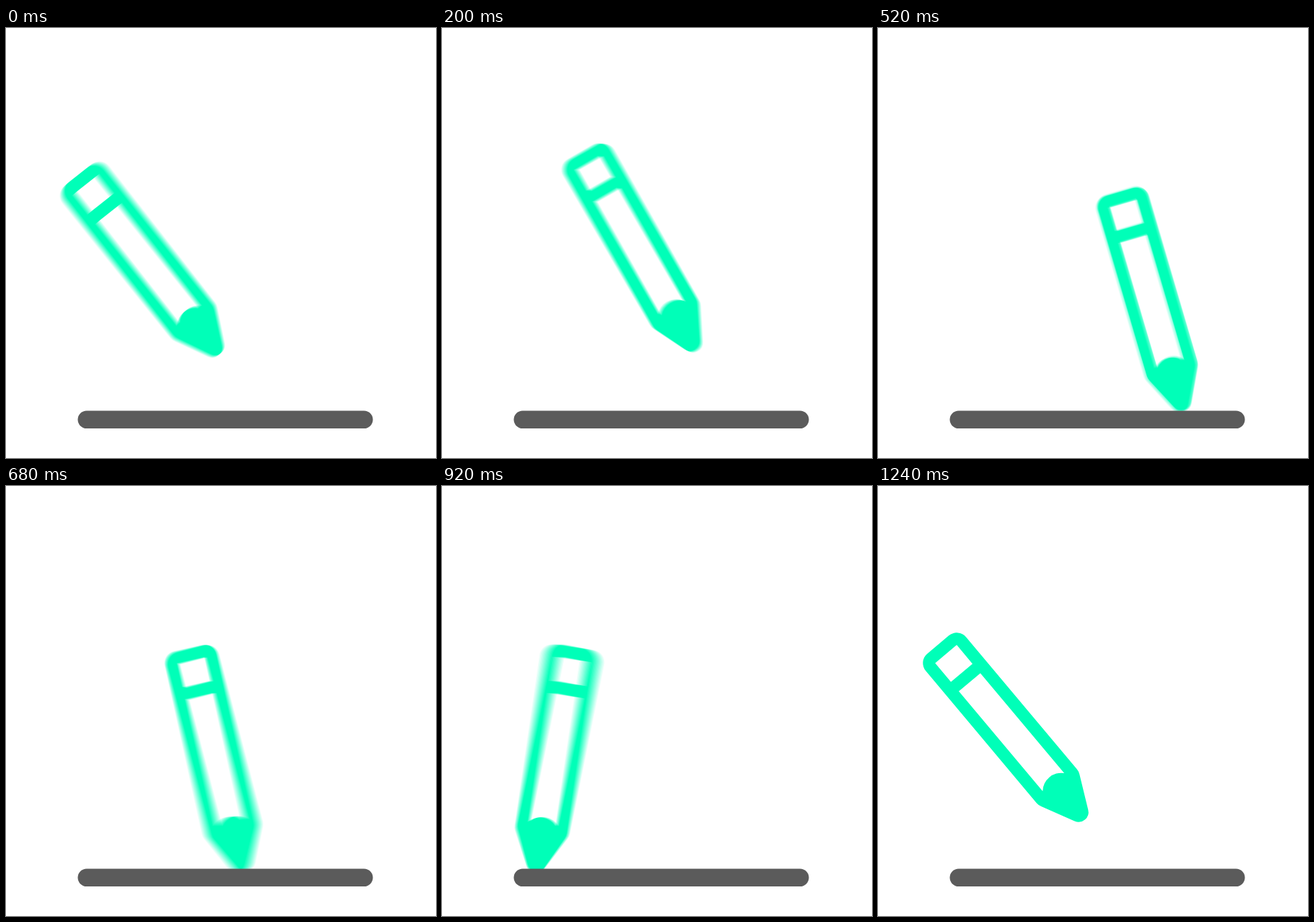
Recreate the animation shown at these times as an HTML page with a canvas. Size 596 px wide and 596 px high, loop 3040 ms.

```html
<!DOCTYPE html>
<html lang="en">
<head>
<meta charset="utf-8">
<title>Pencil</title>
<style>
  html, body { margin: 0; width: 100%; height: 100%; overflow: hidden; background: #fff; }
  canvas { display: block; }
</style>
</head>
<body>
<canvas id="stage" width="596" height="596"></canvas>
<script>
const ctx = document.getElementById('stage').getContext('2d');
const LOOP = 3040, STEP = 40;
const LAND = 13, TURN = 24, REST = 31;
const SAMPLES = 15, SHUTTER = 0.5;
const GREEN = '#00ffb8', GREY = '#5b5b5b';

// Pencil standing upright; the eraser hole starts at y = 0, the pivot is at y = 141.
const PIVOT = 141;
const pencil = new Path2D(
  'M-19.5 -17H19.5A17 17 0 0 1 36.5 0V239Q36.5 243 34.7 246.6L12.3 292' +
  'A13.7 13.7 0 0 1 -12.3 292L-34.7 246.6Q-36.5 243 -36.5 239V0A17 17 0 0 1 -19.5 -17Z' +
  'M-19.5 0H19.5V34H-19.5Z' +
  'M-19.5 51H19.5V231.8A26 26 0 0 0 -19.5 231.8Z');

const bar = new Path2D();
bar.roundRect(99.5, 530.4, 409, 24.6, 12.3);

const home = [184.8, 340.9], right = [381, 379], left = [133.5, 378.7];
const arc = [home, [243, 270], [340, 325], right];

// Tilt in degrees after landing: [step, angle]
const tilt = [[13, 16.2], [15, 15.4], [17, 13.7], [19, -3], [21, -19],
              [23, -10], [24, -1.5], [26, 13.6], [28, 26], [31, 40]];

const mix = (a, b, u) => a + (b - a) * u;
const mixPoint = (a, b, u) => [mix(a[0], b[0], u), mix(a[1], b[1], u)];

function bezier(points, u) {
  while (points.length > 1)
    points = points.slice(1).map((p, i) => mixPoint(points[i], p, u));
  return points[0];
}

// Smooth curve through uneven keys
function spline(keys, x) {
  const last = keys.length - 1;
  let i = 0;
  while (i < last - 1 && x > keys[i + 1][0]) i++;
  const slope = k => {
    const a = keys[Math.max(k - 1, 0)], b = keys[Math.min(k + 1, last)];
    return (b[1] - a[1]) / (b[0] - a[0]);
  };
  const [x0, y0] = keys[i], [x1, y1] = keys[i + 1];
  const w = x1 - x0, u = (x - x0) / w, v = 1 - u;
  return y0 * v * v * (1 + 2 * u) + y1 * u * u * (3 - 2 * u)
       + w * u * v * (v * slope(i) - u * slope(i + 1));
}

function pose(s) {
  if (s >= REST) return { at: home, angle: 40 };
  if (s < LAND) return { at: bezier(arc, (s + 1) / (LAND + 1)), angle: 40 - 1.7 * (s + 1) };
  const at = s < TURN
    ? mixPoint(right, left, (s - LAND) / (TURN - LAND))
    : mixPoint(left, home, (s - TURN) / (REST - TURN));
  return { at, angle: spline(tilt, s) };
}

function drawPencil(s) {
  const { at, angle } = pose(s);
  ctx.save();
  ctx.translate(at[0], at[1]);
  ctx.rotate(-angle * Math.PI / 180);
  ctx.translate(0, -PIVOT);
  ctx.fill(pencil, 'evenodd');
  ctx.restore();
}

function draw(time) {
  const step = Math.min(Math.floor((time % LOOP) / STEP), REST);
  const count = step === REST ? 1 : SAMPLES;
  ctx.clearRect(0, 0, 596, 596);

  // Motion blur: sum the coverage of evenly spaced poses, then tint it.
  ctx.globalCompositeOperation = 'lighter';
  ctx.globalAlpha = 1 / count;
  ctx.fillStyle = '#fff';
  for (let i = 0; i < count; i++)
    drawPencil(step + SHUTTER * ((i + 0.5) / count - 0.5));

  ctx.globalAlpha = 1;
  ctx.globalCompositeOperation = 'source-in';
  ctx.fillStyle = GREEN;
  ctx.fillRect(0, 0, 596, 596);

  ctx.globalCompositeOperation = 'source-over';
  ctx.fillStyle = GREY;
  ctx.fill(bar);
}

const start = performance.now();
function tick() {
  draw(performance.now() - start);
  requestAnimationFrame(tick);
}
tick();
</script>
</body>
</html>
```
